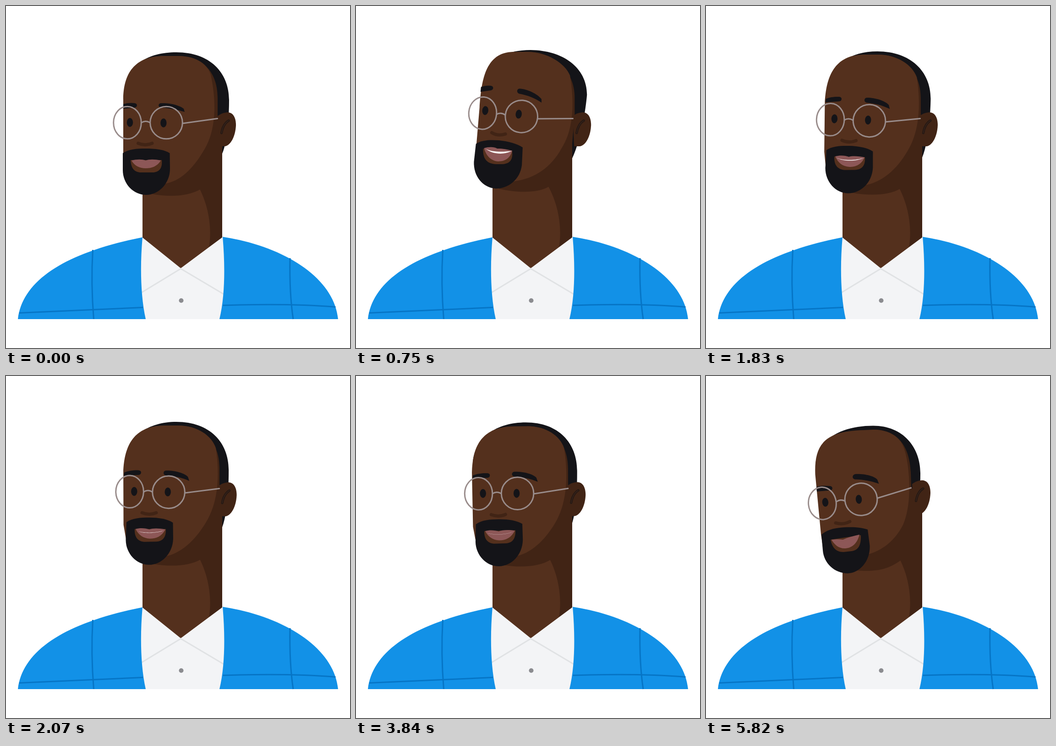
An HTML page for the animation above (8000 ms loop, 751x746 px).

```html
<!DOCTYPE html>
<html>
<head>
<meta charset="utf-8">
<title>Talking portrait</title>
<style>
  html, body { margin: 0; width: 100%; height: 100%; overflow: hidden; background: #fff; }
  svg { display: block; width: 751px; height: 746px; }
  .skin { fill: #54301d; }
  .shade { fill: #412415; }
  .ink { fill: #141418; }
  .line { fill: none; stroke-width: 3; }
</style>
</head>
<body>
<svg viewBox="0 0 751 746">
  <path id="hair" class="ink"/>
  <path class="skin" d="M298,350V506L381,573L472,505V330Z"/>
  <path class="shade" d="M443,526C448,500 449,445 418,390L440,300L472,290V506Z"/>
  <path id="dark" class="shade"/>
  <path id="face" class="skin"/>
  <g id="ear">
    <path class="shade" d="M462,240C470,234 478,232 485,232C497,233 502,245 502,260C501,285 490,304 478,306L465,306Z"/>
    <g fill="none" stroke-linecap="round">
      <path d="M470.5,277Q474,257 486,250" stroke="#221813" stroke-width="5"/>
      <path d="M470.5,277Q474,257 486,250" stroke="#36211a" stroke-width="2"/>
    </g>
  </g>
  <path id="browL" class="ink"/>
  <path id="browR" class="ink"/>
  <path id="nose" fill="none" stroke="#412415" stroke-width="7" stroke-linecap="round"/>
  <path id="beard" class="ink"/>
  <path id="mouth" class="skin"/>
  <path id="lips" fill="#8d5757"/>
  <path id="teeth" fill="#fff"/>
  <g id="eyes" class="ink">
    <ellipse cx="-36.7" rx="6.7" ry="9.7"/>
    <ellipse cx="36.7" rx="6.7" ry="9.7"/>
  </g>
  <g class="line" stroke="#998c8b">
    <path id="temple" stroke-linecap="round"/>
    <g id="glasses">
      <ellipse cx="-85" rx="30.3" ry="35.3"/>
      <circle r="35.3"/>
      <path d="M-54.5,0Q-45,-6 -35.5,0"/>
    </g>
  </g>

  <path fill="#f3f4f6" d="M298,505L381.5,572L473,504L490,683H290V520Z"/>
  <path class="line" stroke="#e0e2e4" d="M296,625L381.5,573L476,629"/>
  <circle cx="382.5" cy="642.5" r="5" fill="#8b8c90"/>
  <g fill="#1291e7">
    <path d="M26,683C36,598 130,538 298,504.500C293,560 293,630 305,683Z"/>
    <path d="M725,683C717,596 612,525 473,503.500C478,560 479,630 466,683Z"/>
  </g>
  <g class="line" stroke="#0675c6">
    <path d="M189.500,532C186,590 188,640 191.500,683"/>
    <path d="M29,669.500Q165,664 299,657.500"/>
    <path d="M620,550C619,600 622,650 627,683"/>
    <path d="M473.500,653C550,650.500 640,650 719.500,656.500"/>
  </g>
</svg>
<script>
// Each part in four poses: level left, raised, level right, lowered.
const parts = {
  hair: [
    'M261,180C266,128 310,101 372,101C445,101 487,145 487,205C487,250 482,300 472,322L450,300L320,200Z',
    'M285,150C300,115 325,97 380,96.5C450,97 502,135 502,195C499,235 489,295 472,332L450,300L320,200Z',
    'M259,190C262,132 310,100 372,100C445,100 486,145 486,205C486,250 483,300 472,330L450,300L320,200Z',
    'M239,198C240,135 300,108.5 365,108.5C430,108.5 468,155 468,212C468,240 466,270 462,290L440,290L320,200Z'],
  dark: [
    'M375,109C425,109 462,140 462,200L462,245L472,300L424,400C400,414 360,418 318,410L320,200Z',
    'M375,101C430,101 476,140 476,200L476,236L472,300L421,395C400,408 355,410 313,400L320,200Z',
    'M375,108C428,108 466,142 466,200L466,240L472,300L425,400C402,414 362,417 320,410L320,200Z',
    'M365,117C412,117 444,145 447,210L448,240L472,300L425,402C395,424 370,427 325,424L320,200Z'],
  face: [
    'M256,205C256,148 280,109 345,109L375,109C420,109 441,130 447,150C458,200 462,270 430,318C408,355 380,383 345,388L300,395L258,355L256,320Z',
    'M268,220C272,165 280,101 345,101L375,101C418,102 455,125 466,152C474,200 477,265 447,312C425,352 390,378 345,384L300,385L260,340L262.5,300Z',
    'M256,210C258,150 280,109 345,108L375,108C418,108 449,130 458,157C465,205 467,270 436,320C413,358 382,388 345,394L300,395L262,356L256.5,325Z',
    'M238.5,215C236,150 258,120 345,118L365,117C402,117 425,135 432,157C444,190 452,275 430,325C413,358 385,382 350,390L300,400L256,380L251,345Z'],
  browL: [
    'M256,214C265,211 275,211 281,212C288,213 287,221 281,221.5L256,224Z',
    'M271,181C278,178 287,177 294,178C301,179 300,187 294,188L270,191Z',
    'M258,211C267,207 280,205.5 290,206C297,207 296,215 290,216L257,218Z',
    'M241,242C250,239 262,239 271,240C278,241 277,249 271,249.5L242,252Z'],
  browR: [
    'M339,212C358,211 380,217 388,224L390,231C372,226 358,223 338,221C331,220 332,212 339,212Z',
    'M356,183.5C373,184 395,194 404,205L404.5,213C388,203 375,198 355,194.5C349,192 350,184 356,183.5Z',
    'M349,206.5C368,206 390,212 397,220L400,229C382,221 368,219 348,217C342,215 343,207 349,206.5Z',
    'M326,214C345,213 367,218 374,226L377.5,235C360,229 345,226 325,225.5C318,224 319,215 326,214Z'],
  nose: [
    'M288.5,299.5Q304,306 319,299.5',
    'M296.5,279Q310,287 326.5,281.5',
    'M297,298.5Q313,305 328,298.5',
    'M283,320.5Q300,325 314,317.5'],
  beard: [
    'M255,321C268,312 285,311 305,311C325,311 345,313 357.5,321L358,355C358,388 332,412 306,412C278,412 255,388 255,358Z',
    'M262,303C275,294 295,294 312,295C332,297 350,301 364,310L362.5,348C359,380 333,400 306,400C277,398 257,373 258,342Z',
    'M263,319C276,310 294,309 313,309C333,309 352,312 364.5,320L365,355C364,388 339,412 312,412C285,412 262,388 261.5,358Z',
    'M252,346C266,334 284,331 303,330C322,329 340,330 353,335L357.5,370C359,403 336,430 309,430.5C280,430 257,408 255,380Z'],
  mouth: [
    'M272,336L340,336C342,354 334,363 320,363L295,363C280,363 273,354 272,336Z',
    'M278,314L342,319C344,338 336,347 318,347L305,347C288,346 277,338 278,314Z',
    'M281,334L349,334C350,352 342,361 328,361.5L302,362C288,361 280,352 281,334Z',
    'M272,357L338,347C339,368 333,380 318,382L300,384C283,384 275,373 272,357Z'],
  lips: [
    'M274,337C285,334 298,334 305,337C312,334 325,334 338,337C330,350 318,354 305,354C292,354 281,349 274,337Z',
    'M280,313C290,310 302,310 309,314C317,313 330,315 342,318C337,335 325,341 311,341C296,340 285,330 280,313Z',
    'M283,334C292,331 306,332 313,335C320,332 334,332 348,335C340,350 328,355 314,355C300,354 290,348 283,334Z',
    'M274,357C284,356 292,356 299,357C310,352 322,349 335,346C330,366 318,376 302,376C290,376 280,368 274,357Z'],
  teeth: [
    'M276,337C290,342 320,342 338,337C320,342 290,342 276,337Z',
    'M283,314.5C297,322 322,322 341,318.5C325,327 300,327 283,314.5Z',
    'M286,338C300,343.5 330,343.5 347,336C330,344.3 300,344.3 286,338Z',
    'M276,358C290,362 315,360 333,348C315,360 290,362 276,358Z'],
  temple: ['M386,256L461.5,245.5', 'M396.5,247L472.5,245.5', 'M391,255L465.5,245.5', 'M374,266.5L447.5,244'],
  glasses: [
    'translate(350 254.5) rotate(0)', 'translate(360.5 242.5) rotate(4.4)',
    'translate(355 253.5) rotate(0.7)', 'translate(338.5 269) rotate(-6)'],
  eyes: [
    'translate(307.2 254.5) rotate(0.8)', 'translate(318.5 234.5) rotate(5.5)',
    'translate(316.5 252.5) rotate(0.8)', 'translate(297 272.2) rotate(-5)'],
  ear: ['translate(0 0)', 'translate(10 0)', 'translate(1.5 0)', 'translate(-12 -4.5)']
};

const number = /-?\d+(\.\d+)?/g;
const drawn = Object.entries(parts).map(([id, poses]) => ({
  id,
  node: document.getElementById(id),
  attr: poses[0][0] === 'M' ? 'd' : 'transform',
  base: poses[0],
  values: poses.map(p => p.match(number).map(Number))
}));

const clamp = x => Math.min(1, Math.max(0, x));

// Cubic easing with control points (x1, 0) and (x2, 1).
function ease(x, x1, x2) {
  x = clamp(x);
  let lo = 0, hi = 1, s = 0.5;
  for (let i = 0; i < 24; i++) {
    s = (lo + hi) / 2;
    const at = 3 * (1 - s) ** 2 * s * x1 + 3 * (1 - s) * s * s * x2 + s ** 3;
    if (at < x) lo = s; else hi = s;
  }
  return s * s * (3 - 2 * s);
}

// Share of each pose at time t; values beyond 0..1 push past a pose.
function weights(t) {
  if (t < 1020) {
    const k = t < 90
      ? -0.15 * ease(t / 90, 0.3, 0.5)
      : -0.15 + 1.15 * ease((t - 90) / 720, 0.3, 0.4);
    return [1 - k, 1.15 * k, -0.15 * k, 0];
  }
  if (t < 3330) {
    const k = -0.15 + 1.22 * ease((t - 1020) / 1470, 0.8, 0.2);
    return [0, 1 - k, k, 0];
  }
  const k = ease((t - 3330) / 1200, 1, 0.1);
  return [0, -0.07 * (1 - k), 1.07 * (1 - k), k];
}

function draw() {
  const t = performance.now() % 8000;
  const w = weights(t);
  const lid = 1 - 0.9 * Math.sin(Math.PI * clamp((t - 5550) / 270));
  for (const { id, node, attr, base, values } of drawn) {
    let i = 0;
    const mixed = base.replace(number, () => {
      const sum = values.reduce((a, v, p) => a + v[i] * w[p], 0);
      i++;
      return +sum.toFixed(2);
    });
    node.setAttribute(attr, id === 'eyes' ? `${mixed} scale(1 ${lid})` : mixed);
  }
  requestAnimationFrame(draw);
}
draw();
</script>
</body>
</html>
```
